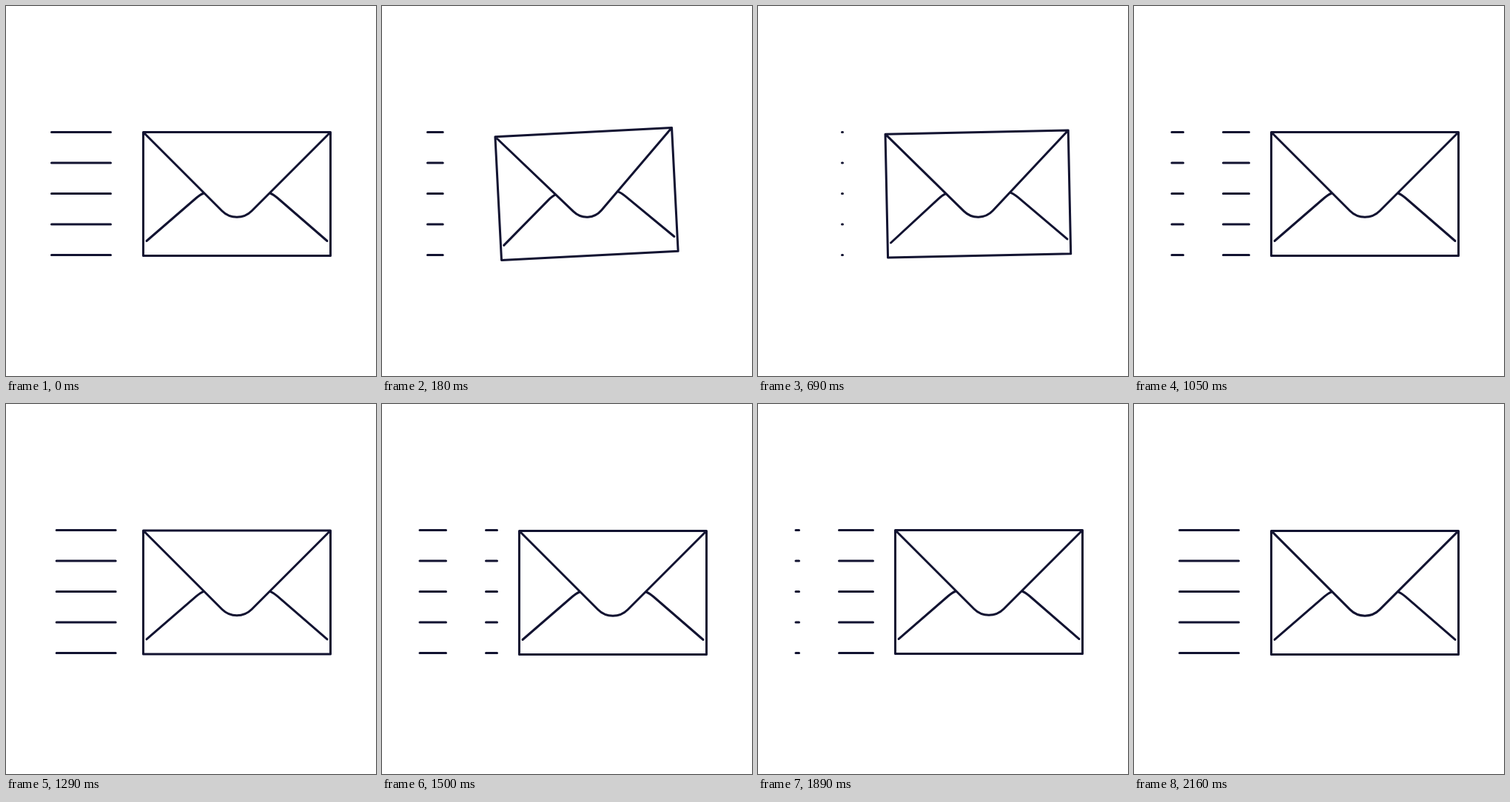
Animation of 500x500 px, one loop 5190 ms. Source, as an HTML page with a canvas:

```html
<!DOCTYPE html>
<html lang="en">
<head>
<meta charset="utf-8">
<title>Sending envelope</title>
<style>
  html, body { margin: 0; height: 100%; overflow: hidden; background: #fff; }
  canvas { display: block; width: 100vw; height: 100vh; }
</style>
</head>
<body>
<canvas id="stage" width="500" height="500"></canvas>
<script>
const ctx = document.getElementById('stage').getContext('2d');
const LOOP = 5190, STEP = 30, MOTION_END = 2160;
const DASH = 80, GAP = 54, LINE_LEFT = 51, LINE_RIGHT = 155.5, REST_LEFT = 61.5;

// Distance the dashes have travelled to the left: [time, distance, speed]
const FLOW = [[690, 0, 0.08], [1050, 48, 0.19], [1500, 162, 0.34], [1890, 327, 0.3], [2160, 375, 0.05]];

const clamp = v => Math.min(1, Math.max(0, v));
const progress = (t, from, to) => clamp((t - from) / (to - from));
const ease = u => u * u * (3 - 2 * u);
const mix = (a, b, u) => a + (b - a) * u;

function hermite(keys, t) {
  let i = 0;
  while (i < keys.length - 2 && t > keys[i + 1][0]) i++;
  const [t0, a, va] = keys[i], [t1, b, vb] = keys[i + 1];
  const u = progress(t, t0, t1), span = t1 - t0, w = 1 - u;
  return mix(a, b, ease(u)) + span * u * w * (va * w - vb * u);
}

function drawEnvelope(t) {
  const pull = ease(progress(t, 0, 495)) - ease(progress(t, 495, 745));
  const bob = t > 1110 ? 0.5 - 0.5 * Math.cos((t - 1110) / 750 * 2 * Math.PI) : 0;

  ctx.save();
  ctx.translate(312 - 118 * pull, 254 + bob);
  ctx.rotate(-9.8 * pull * Math.PI / 180);
  ctx.scale(1 - 0.185 * pull, 1);
  ctx.beginPath();
  ctx.rect(-126.5, -83.5, 253, 167);
  ctx.moveTo(-126, -83);
  ctx.lineTo(-20, 23);
  ctx.bezierCurveTo(-9, 34, 9, 34, 20, 23);
  ctx.lineTo(126, -83);
  for (const side of [-1, 1]) {
    ctx.moveTo(side * 45, -1);
    ctx.quadraticCurveTo(side * 49, 0.5, side * 55, 5.5);
    ctx.lineTo(side * 122, 63.5);
  }
  ctx.restore(); // keeps the stroke width even while the shape is squeezed
  ctx.stroke();
}

function strokeRows(left, right) {
  ctx.beginPath();
  for (let row = 0; row < 5; row++) {
    const y = 170.5 + 41.5 * row;
    ctx.moveTo(left, y);
    ctx.lineTo(right, y);
  }
  ctx.stroke();
}

function drawSpeedLines(t) {
  if (t < 270) {
    strokeRows(REST_LEFT, REST_LEFT + DASH * (1 - ease(progress(t, 0, 270))));
  } else if (t >= 690) {
    const left = mix(113.5, LINE_LEFT, ease(progress(t, 690, 900)));
    const dashStart = 168.5 - hermite(FLOW, t);
    const period = DASH + GAP;
    ctx.setLineDash([DASH, GAP]);
    ctx.lineDashOffset = ((left - dashStart) % period + period) % period;
    strokeRows(left, LINE_RIGHT);
    ctx.setLineDash([]);
  }
}

function draw(now) {
  const t = Math.min(MOTION_END, Math.floor(now % LOOP / STEP) * STEP);
  ctx.fillStyle = '#fff';
  ctx.fillRect(0, 0, 500, 500);
  ctx.strokeStyle = '#121331';
  ctx.lineWidth = 3;
  ctx.lineCap = ctx.lineJoin = 'round';
  drawSpeedLines(t);
  drawEnvelope(t);
}

let start;
function tick(now) {
  start ??= now;
  draw(now - start);
  requestAnimationFrame(tick);
}
draw(0);
requestAnimationFrame(tick);
</script>
</body>
</html>
```
